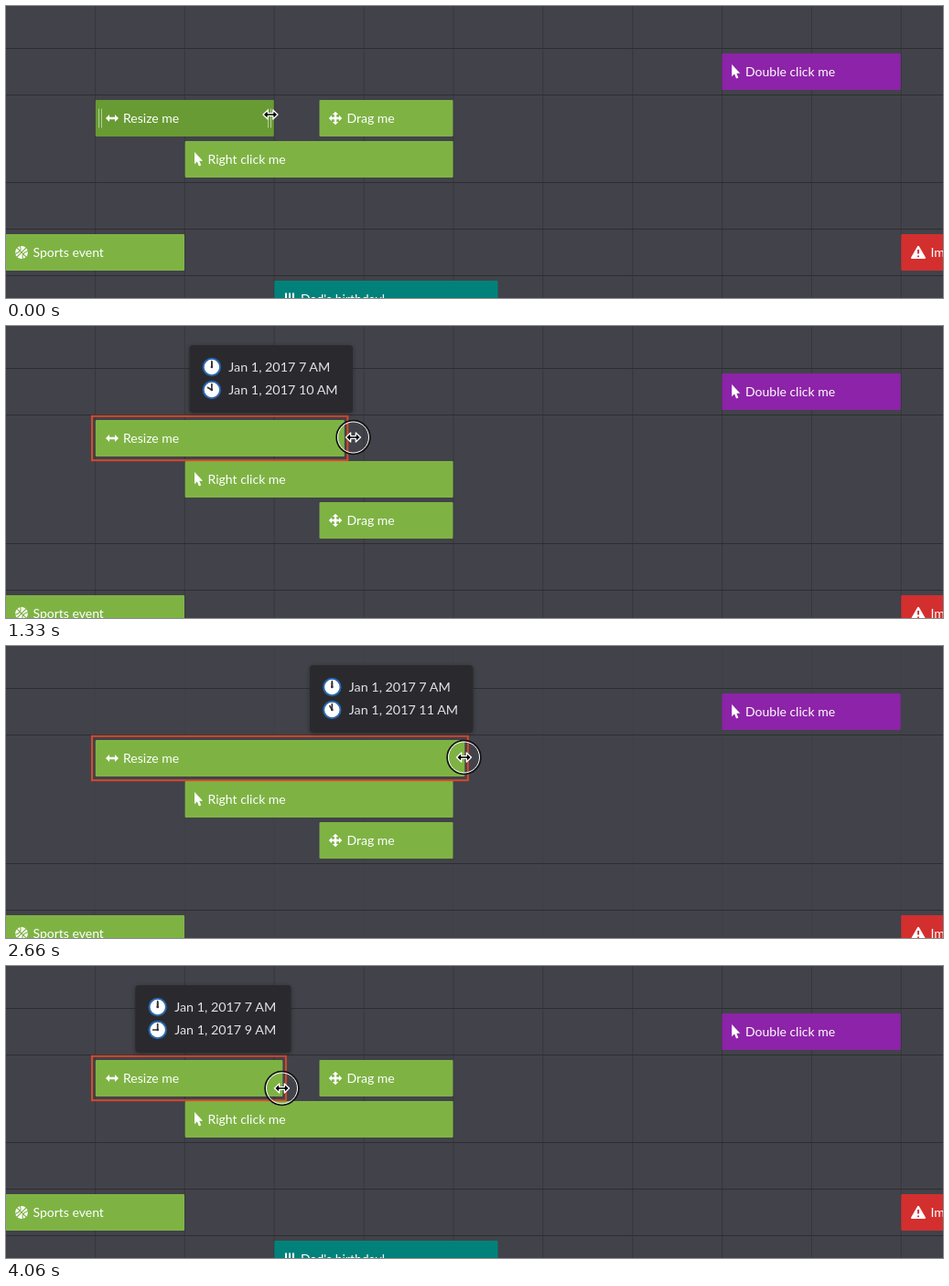
An HTML page for the animation above (4.2 s loop, 1024 px wide and 320 px high).

```html
<!DOCTYPE html>
<html lang="en">
<head>
<meta charset="utf-8">
<title>Scheduler resize</title>
<style>
  html, body { margin: 0; width: 100%; height: 100%; overflow: hidden; background: #42424a; }
  svg { display: block; width: 100vw; height: 100vh; }
  text { font: 14px Lato, "Open Sans", sans-serif; fill: #fff; }
  #tip text { font-size: 14.3px; fill: #e3e3e5; }
</style>
</head>
<body>
<svg id="stage" viewBox="0 0 1024 320">
  <defs>
    <filter id="shadow" x="-20%" y="-20%" width="140%" height="150%">
      <feDropShadow dx="0" dy="1" stdDeviation="2.5" flood-color="#000" flood-opacity=".35"/>
    </filter>
    <g id="resize" fill="#fff">
      <path d="M-7 0L-3-4V-1.3H3V-4L7 0L3 4V1.3H-3V4Z"/>
    </g>
    <g id="pointer" fill="#fff">
      <path d="M-4.3-8V5.2L-1.4 2.6L.6 7.6L2.9 6.6L.9 1.8H4.8Z"/>
    </g>
    <g id="move" fill="#fff">
      <path id="moveArrow" d="M-1.2 0V-4H-3.2L0-7.2L3.2-4H1.2V0Z"/>
      <use href="#moveArrow" transform="rotate(90)"/>
      <use href="#moveArrow" transform="rotate(180)"/>
      <use href="#moveArrow" transform="rotate(270)"/>
    </g>
    <g id="ball">
      <circle r="6.9" fill="#fff"/>
      <path d="M-5-5L5 5M5-5L-5 5M-1.5-7Q1-1-7 1.5M1.5 7Q-1 1 7-1.5" fill="none" stroke="#7eb344" stroke-width="1.1"/>
    </g>
    <g id="warning">
      <path d="M0-6.2L7 6H-7Z" fill="#fff" stroke="#fff" stroke-width="2" stroke-linejoin="round"/>
      <path d="M0-3V1.6M0 3.4V5.2" stroke="#d32f2f" stroke-width="1.9"/>
    </g>
    <g id="candles">
      <path d="M-4-6.5V3M0-6.5V3M4-6.5V3" stroke="#fff" stroke-width="2"/>
      <path d="M-7 2H7V8H-7Z" fill="#fff"/>
    </g>
  </defs>
  <rect width="1024" height="320" fill="#42424a"/>
  <g id="columns" stroke="#37373c"></g>
  <g id="rows" stroke="#2d2d31" stroke-width="1.2"></g>
  <g id="events"></g>
  <g id="handles" stroke="#fff" stroke-opacity=".5"></g>
  <rect id="outline" x="94" y="98.8" height="48.4" fill="none" stroke="#d9482b" stroke-width="2"/>
  <g id="tip"></g>
  <g id="cursor">
    <g id="ring" fill="none">
      <circle r="18.3" stroke="#111" stroke-width="1.8"/>
      <circle r="17" stroke="#fff" stroke-width="1"/>
    </g>
    <path d="M-8 0L-2.8-5V-1.4H2.8V-5L8 0L2.8 5V1.4H-2.8V5Z" fill="#000" stroke="#fff" stroke-width="1.3" stroke-linejoin="round"/>
  </g>
</svg>
<script>
const LOOP = 4200, STEP = 70;
const LEFT = 97.5, HOUR = 97.9, FIRST_HOUR = 7;
const DRAG_START = 910, PRESS = 560, LAG = 55;
const DRAG_ME_LEFT = 342.5, LANE = 45;
const GREEN = [126, 179, 68], HOVER = [104, 155, 51];

const $ = id => document.getElementById(id);
const clamp = v => Math.max(0, Math.min(1, v));

function add(parent, tag, attrs, text) {
  const el = document.createElementNS("http://www.w3.org/2000/svg", tag);
  for (const k in attrs) el.setAttribute(k, attrs[k]);
  if (text) el.textContent = text;
  parent.appendChild(el);
  return el;
}

const shift = (el, x, y) => el.setAttribute("transform", `translate(${x} ${y})`);

// Monotone cubic through [time, value] points
function curve(points) {
  const slope = i => (points[i + 1][1] - points[i][1]) / (points[i + 1][0] - points[i][0]);
  const tangents = points.map((p, i) => {
    if (i === 0 || i === points.length - 1) return 0;
    const a = slope(i - 1), b = slope(i);
    return a * b <= 0 ? 0 : 2 * a * b / (a + b);
  });
  return t => {
    if (t <= points[0][0]) return points[0][1];
    const i = points.findIndex((p, n) => n && t <= p[0]) - 1;
    if (i < 0) return points[points.length - 1][1];
    const [t0, v0] = points[i], [t1, v1] = points[i + 1];
    const d = t1 - t0, u = (t - t0) / d, w = 1 - u;
    return v0 * (1 + 2 * u) * w * w + v1 * u * u * (3 - 2 * u)
      + d * u * w * (tangents[i] * w - tangents[i + 1] * u);
  };
}

const cursorX = curve([
  [0, 289], [280, 289], [770, 293], [980, 321], [1330, 379.5], [1680, 463], [1850, 496],
  [1960, 500.5], [3080, 500.5], [3220, 470], [3430, 395], [3640, 319.5], [3780, 303], [4060, 301.5]
]);
const cursorY = curve([
  [0, 119], [280, 119], [770, 121], [1330, 122], [3220, 122], [3640, 133], [4060, 134]
]);

// Grid
for (let i = 1; i <= 10; i++) {
  const x = i * 97.87 - 0.4;
  add($("columns"), "line", { x1: x, x2: x, y1: 0, y2: 320 });
}
const rowLines = [46, 97, 193, 244, 295].map(y =>
  ({ y, el: add($("rows"), "line", { x1: 0, x2: 1024, y1: y + .5, y2: y + .5 }) }));

function addEvent(x, y, width, color, icon, iconX, textX, label) {
  const g = add($("events"), "g", {});
  const rect = add(g, "rect", { x, width, height: 40, rx: 1, fill: color });
  add(g, "use", { href: "#" + icon, x: iconX, y: 20 });
  add(g, "text", { x: textX, y: 25 }, label);
  shift(g, 0, y);
  return { g, rect, y };
}

const green = `rgb(${GREEN})`;
const resizeEvent = addEvent(97.8, 103, 195, green, "resize", 116, 128, "Resize me");
const dragEvent = addEvent(DRAG_ME_LEFT, 103, 146, green, "move", 360, 372.5, "Drag me");
addEvent(195.6, 148, 293, green, "pointer", 210.3, 220.5, "Right click me");
addEvent(782.5, 52, 195.2, "#8d23a8", "pointer", 797.5, 808, "Double click me");
const lowerEvents = [
  addEvent(-10, 250, 205, green, "ball", 17, 29.5, "Sports event"),
  addEvent(978.2, 250, 150, "#d32f2f", "warning", 997, 1010.5, "Important meeting"),
  addEvent(293.3, 301, 244.2, "#00827a", "candles", 310, 322, "Dad's birthday!")
];

for (const x of [101.5, 104.5, 286.5, 289.5])
  add($("handles"), "line", { x1: x, x2: x, y1: 112.5, y2: 133.5 });

// Tooltip
const tipBox = add($("tip"), "rect", { y: 21, height: 74, rx: 4, fill: "#2b2b2e", filter: "url(#shadow)" });

function addTipRow(y) {
  const g = add($("tip"), "g", {});
  const clock = add(g, "g", { transform: `translate(24.5 ${y})` });
  add(clock, "circle", { r: 9.2, fill: "#fff", stroke: "#2967b0", "stroke-width": 2 });
  const hand = length => add(clock, "line",
    { y2: -length, stroke: "#333", "stroke-width": 1.7, "stroke-linecap": "round" });
  const hour = hand(5), minute = hand(6.3);
  add(clock, "circle", { r: 1.3, fill: "#333" });
  return { g, hour, minute, text: add(g, "text", { x: 43, y: y + 5.3 }) };
}
const startRow = addTipRow(45), endRow = addTipRow(70);
startRow.text.textContent = "Jan 1, 2017 7 AM";

function updateTip(right) {
  const time = FIRST_HOUR + Math.round((right - LEFT) / HOUR * 2) / 2;
  const hour = Math.floor(time), half = time % 1;
  endRow.text.textContent = `Jan 1, 2017 ${hour}${half ? ":30" : ""} AM`;
  endRow.hour.setAttribute("transform", `rotate(${time * 30})`);
  endRow.minute.setAttribute("transform", `rotate(${half * 360})`);
  const width = 59.5 + Math.max(startRow.text.getComputedTextLength(), endRow.text.getComputedTextLength());
  const x = right + 9.3 - width;
  tipBox.setAttribute("x", x);
  tipBox.setAttribute("width", width);
  shift(startRow.g, x, 0);
  shift(endRow.g, x, 0);
}

function draw(t) {
  const dragging = t >= DRAG_START;
  const right = dragging ? cursorX(t - LAG) + 0.8 : 292.8;
  const grow = right > DRAG_ME_LEFT ? LANE : 0;
  const fade = clamp((t - DRAG_START) / 210);

  resizeEvent.rect.setAttribute("width", right - 97.8);
  resizeEvent.rect.setAttribute("fill",
    `rgb(${HOVER.map((c, i) => Math.round(c + (GREEN[i] - c) * fade))})`);
  shift(dragEvent.g, 0, dragEvent.y + 2 * grow);
  for (const e of lowerEvents) shift(e.g, 0, e.y + grow);
  for (const r of rowLines) shift(r.el, 0, r.y > 100 ? grow : 0);
  $("columns").setAttribute("opacity", grow && t > 1330 ? .2 : 1);

  $("handles").setAttribute("visibility", dragging ? "hidden" : "visible");
  $("outline").setAttribute("visibility", dragging ? "visible" : "hidden");
  $("outline").setAttribute("width", right + 3.5 - 94);
  $("tip").setAttribute("opacity", fade);
  updateTip(right);

  $("ring").setAttribute("opacity", clamp((t - PRESS) / 140));
  shift($("cursor"), cursorX(t), cursorY(t));
}

function frame() {
  const t = performance.now() % LOOP;
  draw(Math.floor(t / STEP) * STEP);
  requestAnimationFrame(frame);
}
frame();
</script>
</body>
</html>
```
